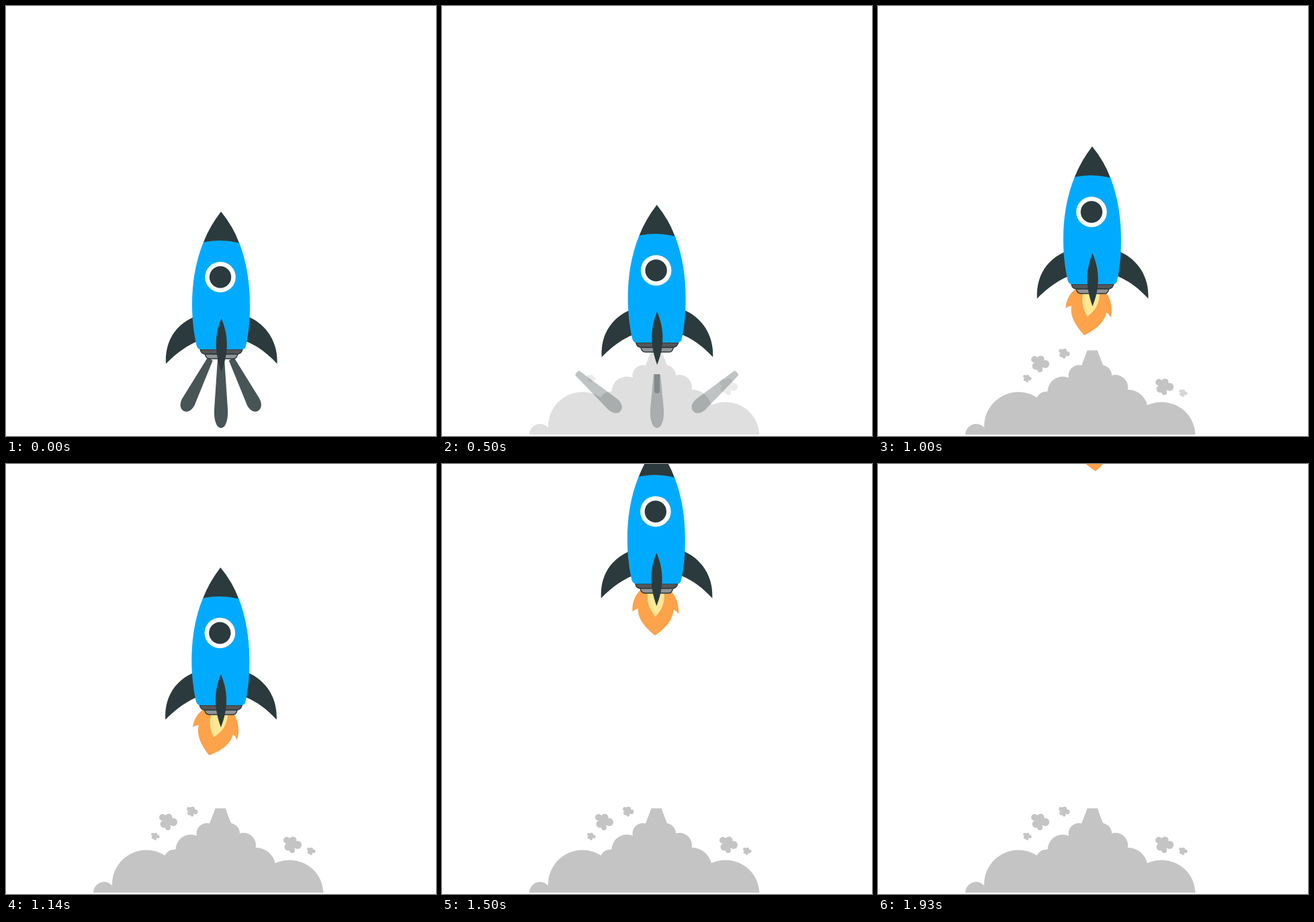
An HTML page that plays this animation: 640x640 px, repeating every 2000 ms.

```html
<!DOCTYPE html>
<html lang="en">
<head>
<meta charset="utf-8">
<title>Rocket launch</title>
<style>
  html, body { margin: 0; width: 100%; height: 100%; overflow: hidden; background: #fff; }
  svg { display: block; width: 100%; height: 100%; }
</style>
</head>
<body>
<svg viewBox="0 0 640 640">
  <defs>
    <clipPath id="ground"><rect width="640" height="638"/></clipPath>
    <clipPath id="reveal"><circle id="revealCircle" cx="306" cy="467"/></clipPath>
    <g id="puff">
      <circle cx="-8" cy="-6" r="5"/><circle cx="1" cy="-6" r="5.5"/>
      <circle cx="8" cy="1" r="6"/><circle cy="9" r="4"/>
      <circle cx="-6" cy="4" r="5.5"/><circle r="7"/>
    </g>
    <path id="drop" d="M-4.5 -74Q0 -76 4.5 -74L10 -8C12 4 7 12 0 12S-12 4 -10 -8Z"/>
  </defs>

  <g clip-path="url(#ground)" fill="#c4c4c4">
    <g id="smoke" clip-path="url(#reveal)">
      <circle cx="146" cy="638" r="16"/><circle cx="209" cy="625.5" r="51"/>
      <circle cx="250" cy="589" r="15"/><circle cx="275" cy="574" r="22.5"/>
      <circle cx="299" cy="550" r="15.5"/><circle cx="332.5" cy="550" r="15.5"/>
      <circle cx="353.5" cy="567.5" r="18.5"/><circle cx="372" cy="600.5" r="29.5"/>
      <circle cx="422" cy="640" r="50.5"/>
      <path d="M209 640L237 583 253 573 284 553 303 535 311.500 512.500H326.500L335 535 347 550 371 570 401 594 422 640Z"/>
    </g>
    <g id="puffs"></g>
  </g>

  <g id="streaks" fill="#2b3a3c">
    <use id="leftDrop" href="#drop"/>
    <use id="rightDrop" href="#drop"/>
    <path id="midDrop"/>
    <path id="midCore"/>
  </g>

  <g id="rocket" fill="#2b3a3c">
    <g id="flame">
      <path fill="#fca34b" d="M297 520C287 530 284 541 285 553Q289 549 293 548C293 564 304 576 319 588C331 579 345 568 346 549Q351 551 353.500 556C355 543 350 530 341 520Z"/>
      <path fill="#ffe793" d="M308 520C305 537 309 547 319 560C330 549 334 537 331 520Z"/>
    </g>
    <path d="M279 463C252 475 236 500 238 532.500C252 518 268 506 285 499Z"/>
    <path d="M362 463C388 475 405 500 403.500 532.500C390 518 375 506 357 499Z"/>
    <g stroke="#2b3a3c" stroke-width="1.4">
      <path fill="#919396" d="M296 518H345Q343 525 339 525H303Q298 525 296 518Z"/>
      <path fill="#545658" d="M289 511H352Q350 518 344 518H297Q290 518 289 511Z"/>
    </g>
    <path fill="#00abff" d="M294 351C281 383 277 415 277 445C277 468 280 490 283.500 505Q285 511 290 511H351Q356 511 357 506C361 488 363 468 363 445C363 415 359 383 347 352Q320 346 294 351Z"/>
    <path d="M320 306Q303 328 294 351.500Q320 346 347 352.500Q338 328 320 306Z"/>
    <circle cx="319" cy="403.500" r="22.800" fill="#fff"/>
    <circle cx="319" cy="403.500" r="16.200"/>
    <path d="M320.500 465C331 490 332 515 320.500 544C310 515 310 490 320.500 465Z"/>
  </g>
</svg>
<script>
const LOOP = 2000, STEPS = 28;
const $ = id => document.getElementById(id);
const clamp = v => Math.max(0, Math.min(1, v));
const attr = (el, name, value) => el.setAttribute(name, value);

// Keys are [step, value] pairs.
function segment(keys, s) {
  let i = 0;
  while (i < keys.length - 2 && s > keys[i + 1][0]) i++;
  return i;
}
function linear(keys, s) {
  const i = segment(keys, s), [a, va] = keys[i], [b, vb] = keys[i + 1];
  return va + (vb - va) * clamp((s - a) / (b - a));
}
function smooth(keys, s) {
  const i = segment(keys, s), [a, va] = keys[i], [b, vb] = keys[i + 1];
  const slope = k => {
    const p = keys[Math.max(0, k - 1)], q = keys[Math.min(keys.length - 1, k + 1)];
    return (q[1] - p[1]) / (q[0] - p[0]);
  };
  const h = b - a, u = clamp((s - a) / h), w = 1 - u;
  return va * (1 + 2 * u) * w * w + slope(i) * h * u * w * w
       + vb * u * u * (3 - 2 * u) - slope(i + 1) * h * u * u * w;
}

const shakeX = [[0, 0], [4, .8], [8, -1], [10, -3.5], [14, -1.2], [18, -.6], [24, -1.7], [27, -1]];
const climb = [[0, 0], [4, 1.6], [8, -15], [10, -27.5], [14, -97], [16, -152], [18, -227.5], [24, -442], [27, -577]];
const sway = [[7, 0], [10, -2], [14, 9.5], [16, 14], [18, 1], [24, 1.5], [27, -5]];
const smokeFade = [[0, 0], [4, .34], [10, .73], [14, 1]];
const streakFade = [[0, .86], [4, .52], [10, .085], [12, 0]];
const dropX = [[0, 270], [4, 261.5], [10, 252]];
const dropY = [[0, 592], [4, 590], [10, 600]];
const dropTurn = [[0, 27], [4, -12], [10, -85.5]];
const midTop = [[0, 525], [4, 528], [10, 568]];
const coreEnd = [[0, 525], [4, 577], [10, 576]];

// x, y, scale, first and last step of the fade
const puffs = [
  [241, 532, 1, 8, 12], [277, 517, .6, 8, 12], [222, 554, .46, 6, 9],
  [426, 566, 1, 6, 9], [454, 576, .46, 12, 15]
].map(([x, y, scale, from, to]) => {
  const el = document.createElementNS('http://www.w3.org/2000/svg', 'g');
  el.innerHTML = '<use href="#puff"/>';
  attr(el, 'transform', `translate(${x} ${y}) scale(${scale})`);
  $('puffs').append(el);
  return { el, from, to };
});

function draw(time) {
  const s = Math.floor((time % LOOP + 5) * STEPS / LOOP) % STEPS;

  attr($('rocket'), 'transform', `translate(${smooth(shakeX, s)} ${smooth(climb, s)})`);
  const size = clamp((s - 7) / 4.7);
  attr($('flame'), 'transform',
    `translate(320 522) rotate(${smooth(sway, s)}) scale(${size}) translate(-320 -522)`);
  attr($('flame'), 'visibility', size ? 'visible' : 'hidden');

  attr($('smoke'), 'opacity', linear(smokeFade, s));
  attr($('revealCircle'), 'r', 187 * s / 4);
  for (const { el, from, to } of puffs) attr(el, 'opacity', clamp((s - from) / (to - from)));

  const fade = linear(streakFade, s);
  for (const el of $('streaks').children) attr(el, 'opacity', fade);
  const pose = `translate(${linear(dropX, s)} ${linear(dropY, s)}) rotate(${linear(dropTurn, s)})`;
  attr($('leftDrop'), 'transform', pose);
  attr($('rightDrop'), 'transform', `translate(639.5 0) scale(-1 1) ${pose}`);
  const top = linear(midTop, s), end = linear(coreEnd, s);
  attr($('midDrop'), 'd', `M315 ${top}H325L330 600C331 618 326 628 320 628S309 618 310 600Z`);
  attr($('midCore'), 'd', end > top ? `M316 ${top}H324V${end - 3}Q324 ${end} 320 ${end}T316 ${end - 3}Z` : '');
}

const start = performance.now();
function tick() {
  draw(performance.now() - start);
  requestAnimationFrame(tick);
}
tick();
</script>
</body>
</html>
```
